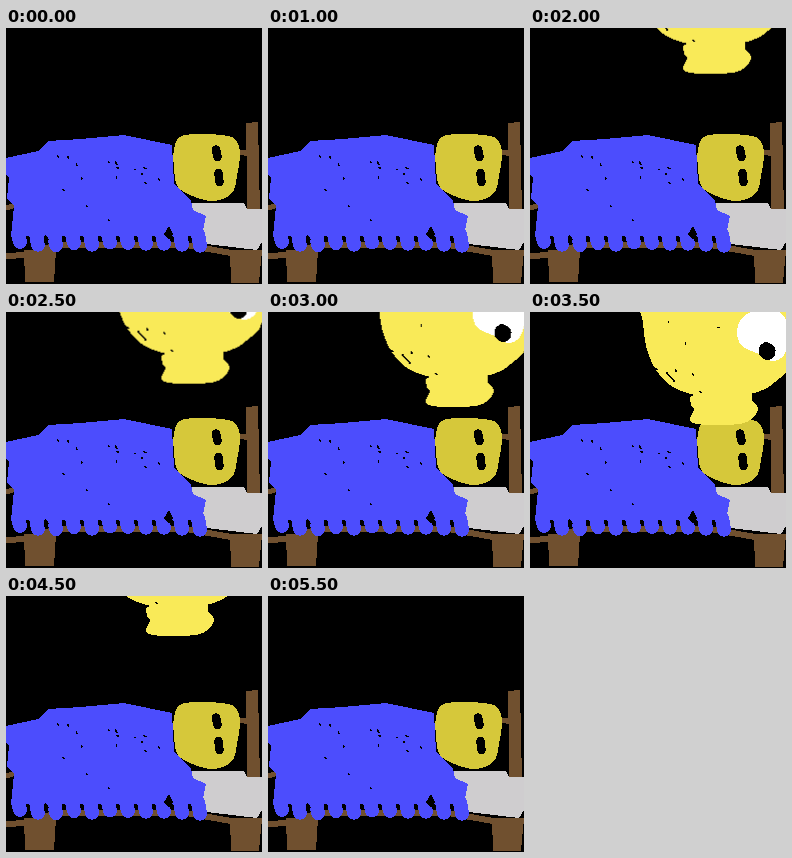
These frames come from a looping animation (256x256 px, 6000 ms). An HTML page:

```html
<!DOCTYPE html>
<html lang="en">
<head>
<meta charset="utf-8">
<title>Night visitor</title>
<style>
  html, body { margin: 0; width: 100%; height: 100%; overflow: hidden; background: #000; }
  svg { display: block; width: 100%; height: 100%; shape-rendering: crispEdges; }
  path { stroke-linecap: round; stroke-linejoin: round; }
</style>
</head>
<body>
<svg viewBox="0 0 256 256">
  <g id="bed"></g>
  <g id="visitor"></g>
</svg>
<script>
  const wood = "#70502f", sheet = "#cfcdcf", blue = "#4c4dfd";
  const dim = "#d6c83a", bright = "#f9ea58";
  const bed = document.getElementById("bed");
  const visitor = document.getElementById("visitor");

  let seed = 5;
  const rand = () => (seed = seed * 16807 % 2147483647) / 2147483647;

  function add(group, d, style) {
    const path = document.createElementNS("http://www.w3.org/2000/svg", "path");
    path.setAttribute("d", d);
    for (const key in style) path.setAttribute(key, style[key]);
    group.append(path);
  }

  const line = (group, d, color, width) =>
    add(group, d, { fill: "none", stroke: color, "stroke-width": width });

  // Closed smooth outline through a few points "x,y x,y ...".
  function blob(group, text, fill) {
    const pts = text.split(" ").map(p => p.split(",").map(Number));
    const at = i => pts[(i + pts.length) % pts.length];
    let d = `M${at(0)}`;
    pts.forEach((p, i) => {
      const q = at(i + 1);
      const a = p.map((v, k) => v + (q[k] - at(i - 1)[k]) / 6);
      const b = q.map((v, k) => v - (at(i + 2)[k] - p[k]) / 6);
      d += `C${a} ${b} ${q}`;
    });
    add(group, d + "Z", { fill });
  }

  function specks(group, count, x, y, w, h) {
    for (let i = 0; i < count; i++) {
      line(group, `M${x + w * rand()} ${y + h * rand()}l${rand() * 2} ${rand() * 2}`, "#000", 1.5);
    }
  }

  // Bed frame
  line(bed, "M0 228L20 227L50 217H180L225 225H256", wood, 6);
  add(bed, "M18 222H50L48 254H19Z M224 222H256L253 255H225Z M240 95L252 94L254 184H241V128L234 127V122H240Z", { fill: wood });
  line(bed, "M0 180L7 178M168 177h1", wood, 5);
  add(bed, "M184 175L238 175L241 181H256V214L251 222L201 216L186 183Z", { fill: sheet });

  // Blanket with a scalloped hem
  add(bed, "M0 130L32 123L42 113L75 111L118 107L166 117L168 156L185 172L187 182L200 188L196 208H5L8 178L1 170L3 150L0 146Z", { fill: blue });
  for (let x = 12; x < 195; x += 18) {
    line(bed, `M${x} 206L${x + 2} ${214 + rand() * 4}`, blue, 14);
  }
  specks(bed, 16, 10, 122, 155, 75);
  add(bed, "M163 198L167 206L163 212L158 206Z M39 206L43 212L38 215Z", { fill: "#000" });

  // Sleeper
  blob(bed, "168,121 174,109 190,106 215,107 229,111 234,125 231,148 226,165 209,173 189,169 172,159 168,140", dim);
  line(bed, "M210 121.500L211.500 129M212.500 145L213.500 154", "#000", 8.500);

  // Visitor
  blob(visitor, "113,-40 113,10 119,44 135,69 157,81 190,86 224,81 245,70 262,45 262,-40", bright);
  blob(visitor, "165,83 161,92 164,98 160,107 167,112 194,113 217,110 228,98 222,88 216,80", bright);
  blob(visitor, "207,20 213,5 232,-3 252,2 260,22 254,43 242,49 229,42 212,34", "#fff");
  blob(visitor, "230,34 237,30 245,36 244,45 236,48 229,42", "#000");
  line(visitor, "M137 61L144 69", "#000", 1.5);
  specks(visitor, 7, 120, 5, 80, 75);

  // Leans in with slowing steps, then leaves at a steady pace.
  const step = 500, count = 12, closest = 7;
  const frames = [];
  for (let i = 0; i <= count; i++) {
    const d = i % count - closest;
    const x = d < 0 ? 2.3 * d : -10 * d;
    const y = d < 0 ? -18 * (-d) ** 1.2 : -36.5 * d;
    frames.push({ transform: `translate(${x}px, ${y}px)`, easing: "steps(1, end)" });
  }
  visitor.animate(frames, { duration: step * count, iterations: Infinity });
</script>
</body>
</html>
```
